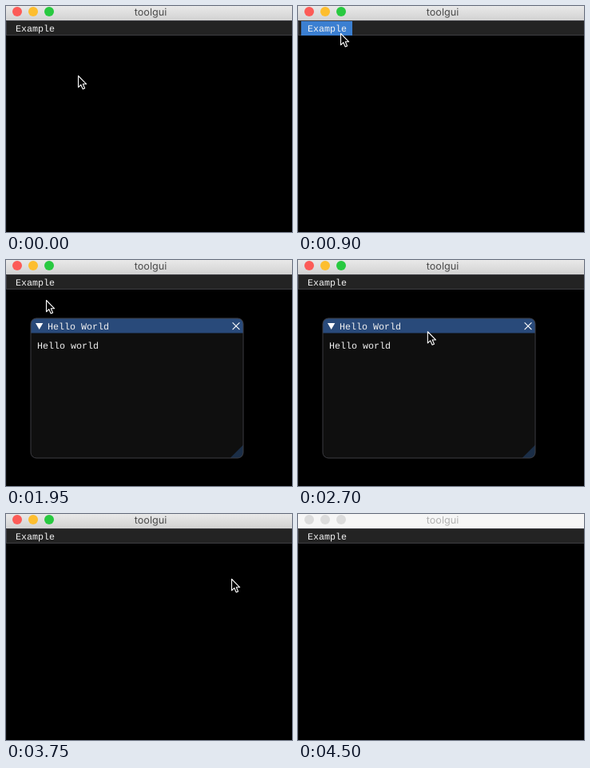
Animation of 358x283 px, one loop 4.6 s. Source, as an HTML page:

```html
<!DOCTYPE html>
<html lang="en">
<head>
<meta charset="utf-8">
<title>toolgui</title>
<style>
  html, body { margin: 0; width: 100%; height: 100%; overflow: hidden; background: #000; }
  svg { display: block; width: 358px; height: 283px; }
  text { fill: #f2f2f2; font: 11.667px "Liberation Mono", "DejaVu Sans Mono", monospace; text-rendering: geometricPrecision; white-space: pre; }
  .caption { fill: #4b4b4b; font: 12.6px Inter, Roboto, sans-serif; text-anchor: middle; }
  .line { fill: none; stroke: #3d3d42; }
  .blurred .bar { fill: #f6f6f6; }
  .blurred .light { fill: #dcdcdc; }
  .blurred .caption { fill: #b2b2b2; }
  .hidden { display: none; }
</style>
</head>
<body>
<svg id="stage" viewBox="0 0 358 283">
  <defs>
    <linearGradient id="chrome" x2="0" y2="1">
      <stop stop-color="#e9e9e9"/>
      <stop offset="1" stop-color="#d2d2d2"/>
    </linearGradient>
  </defs>
  <rect width="358" height="283"/>
  <path d="M.5 37V283" stroke="#0e0e0e"/>

  <rect class="bar" width="358" height="18" fill="url(#chrome)"/>
  <circle class="light" cx="14" cy="7" r="6" fill="#fc5b57"/>
  <circle class="light" cx="34" cy="7" r="6" fill="#fdbe2f"/>
  <circle class="light" cx="54" cy="7" r="6" fill="#28c940"/>
  <text class="caption" x="181" y="12">toolgui</text>

  <rect y="18" width="358" height="19" fill="#232323"/>
  <path class="line" d="M358 18.5H.5V36.5H358"/>
  <rect id="tab" x="4" y="19" width="64" height="18"/>
  <text x="12" y="32">Example</text>

  <g id="popup">
    <rect x="3" y="37" width="115" height="29" fill="#131313"/>
    <rect class="line" x="3.5" y="37.5" width="114" height="28"/>
    <rect id="item" x="7" y="43" width="107" height="17" fill="#3780d2"/>
    <text x="11" y="56">Hello World</text>
  </g>

  <g id="win">
    <rect x="31" y="73" width="266" height="175" rx="7" fill="#0f0f0f"/>
    <path d="M31 91.500V80a7 7 0 0 1 7-7H290a7 7 0 0 1 7 7V91.500Z" fill="#294a7a"/>
    <path d="M280.500 248L297 231.500V241a7 7 0 0 1-7 7Z" fill="#1b2e47"/>
    <rect class="line" x="31" y="73" width="266" height="175" rx="7"/>
    <path d="M37 79H46.300L41.650 87Z" fill="#fff"/>
    <text x="52" y="87">Hello World</text>
    <circle id="close" cx="288" cy="82.700" r="7.500"/>
    <path d="M283.600 78.300l8.800 8.800m0-8.800l-8.800 8.800" stroke="#fff" stroke-width="1.100"/>
    <text x="39" y="111">Hello world</text>
  </g>

  <path id="cursor" d="M.5.5V14.800L3.800 11.700 6.200 17 8.600 16 6.300 10.800H10.700Z" fill="#000" stroke="#fff" stroke-width="1.100" stroke-linejoin="round"/>
</svg>
<script>
  const LOOP = 4600, TICK = 150;
  const OPEN = 1050, PICK = 1950, PRESS = 3600, CLOSE = 3750, BLUR = 4500;
  const $ = id => document.getElementById(id);

  // Pointer stops; it eases from one to the next.
  const rest = { x: 90, y: 87 };
  const moves = [
    { from: 0, to: 900, x: 53, y: 34 },        // menu
    { from: 1200, to: 1800, x: 50, y: 50 },    // menu item
    { from: 2400, to: 2850, x: 201, y: 103 },  // title bar
    { from: 3000, to: 3340, x: 282, y: 81 },   // close button
    { from: 3750, to: 4200, x: 335, y: 300 }   // off stage
  ];

  const smooth = k => k * k * (3 - 2 * k);

  function pointer(t) {
    return moves.reduce((p, m) => {
      const k = smooth(Math.min(1, Math.max(0, (t - m.from) / (m.to - m.from))));
      return { x: p.x + (m.x - p.x) * k, y: p.y + (m.y - p.y) * k };
    }, rest);
  }

  const show = (el, on) => el.classList.toggle("hidden", !on);

  function render(time) {
    // The screen is sampled once per tick.
    const t = Math.floor((time % LOOP) / TICK) * TICK;
    const { x, y } = pointer(t);
    const open = t >= OPEN && t < PICK;
    const overTab = y < 37 && x < 68;

    $("cursor").setAttribute("transform", `translate(${x} ${y})`);
    show($("tab"), open || overTab);
    $("tab").setAttribute("fill", overTab ? "#3b7fd1" : "#29496c");
    show($("popup"), open);
    show($("item"), y >= 43);
    show($("win"), t >= PICK && t < CLOSE);
    show($("close"), x > 280);
    $("close").setAttribute("fill", t < PRESS ? "#4296fa" : "#0f87fa");
    $("stage").classList.toggle("blurred", t >= BLUR);
  }

  const start = performance.now();
  function frame() {
    render(performance.now() - start);
    requestAnimationFrame(frame);
  }
  frame();
</script>
</body>
</html>
```
